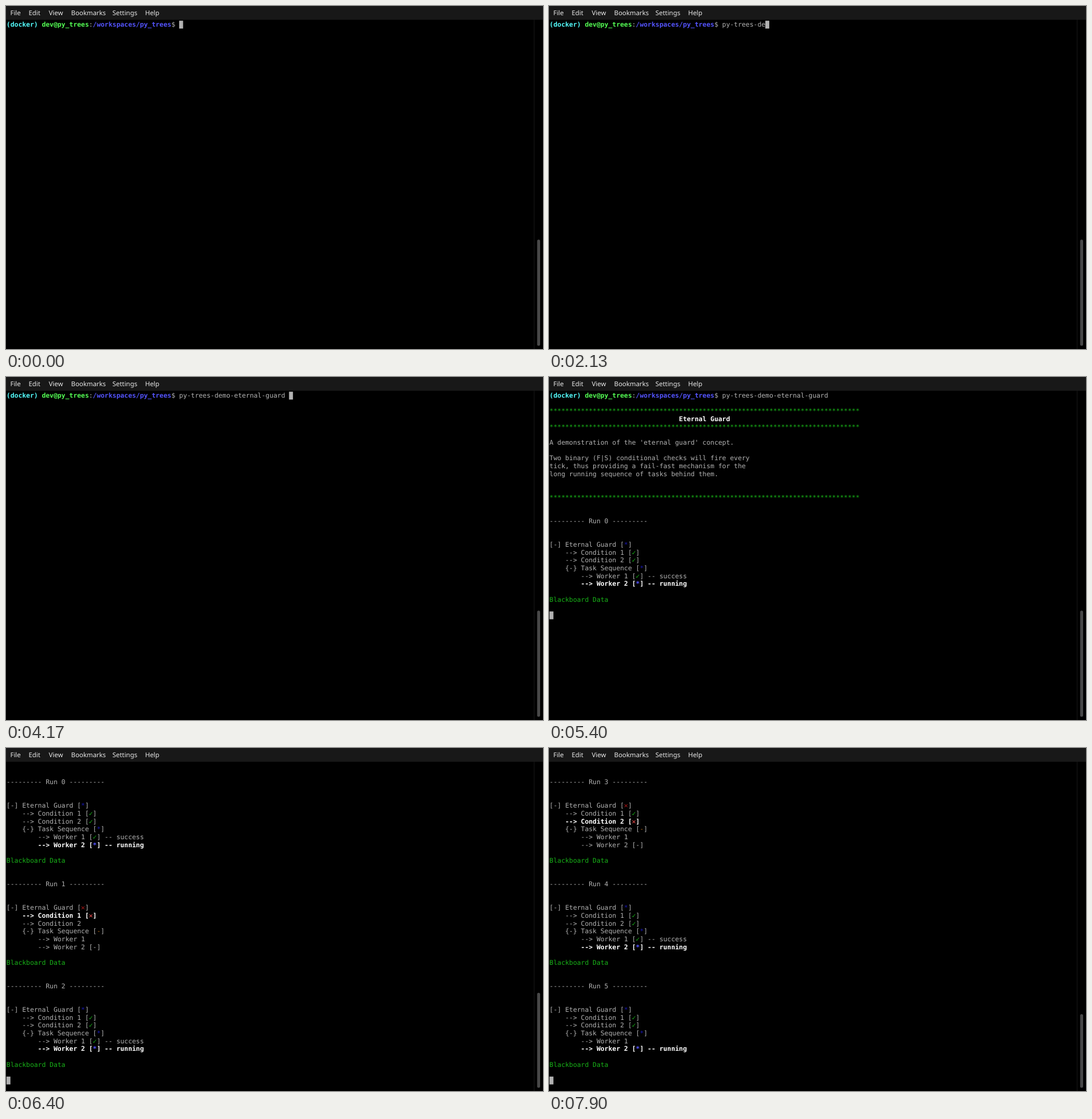
Recreate the animation shown at these times as an HTML page with a canvas. Size 936x598 px, loop 8000 ms.

```html
<!DOCTYPE html>
<html>
<head>
<meta charset="utf-8">
<style>
html, body { margin: 0; height: 100%; overflow: hidden; background: #000; }
canvas { display: block; }
</style>
</head>
<body>
<canvas width="936" height="598"></canvas>
<script>
const ctx = document.querySelector('canvas').getContext('2d');
const LOOP = 8000, SCALE = 0.855;
const CELL_W = 8, CELL_H = 16, LEFT = 1, TOP = 30, ROWS = 41;

// Lower case: normal weight, upper case: bold
const COLORS = {
  n: '#b2b2b2', g: '#18b218', b: '#1818b2', r: '#b21818', y: '#b26818',
  W: '#ffffff', G: '#54ff54', B: '#5454ff', R: '#ff5454', C: '#54ffff'
};
const MENU = { File: 8, Edit: 40, View: 75, Bookmarks: 114, Settings: 186, Help: 243 };

// "~x" inside a line switches to style x
const PROMPT = '~C(docker) ~Gdev@py_trees~n:~B/workspaces/py_trees~n$ ';
const PROMPT_COLS = 44;
const COMMAND = 'py-trees-demo-eternal-guard ';
const KEY_TIMES = [510, 610, 790, 880, 1080, 1160, 1300, 1480, 1780, 1980, 2130, 2190,
  2260, 2580, 2790, 2970, 3110];
const TYPO = 3260, ERASE = 3810, RETYPE = 3910, NEXT_KEY = 4010, COMPLETE = 4170;
const ENTER = 5200, FIRST_RUN = 5400, RUN_STEP = 500, RUN_ROWS = 13, FIRST_CURSOR = 28;

const STARS = '~g' + '*'.repeat(79);
const OK = '[~g✓~n]';
const INTRO = [
  '', STARS, ' '.repeat(33) + '~WEternal Guard', STARS, '',
  "A demonstration of the 'eternal guard' concept.", '',
  'Two binary (F|S) conditional checks will fire every',
  'tick, thus providing a fail-fast mechanism for the',
  'long running sequence of tasks behind them.', '', '', STARS, '', ''
];

function run(n, failedCondition, firstWorkerDone) {
  const mark = failedCondition ? '~r✕' : '~b*';
  const condition = i =>
    failedCondition === i ? `    ~W--> Condition ${i} [~R✕~W]`
    : `    --> Condition ${i}` + (failedCondition && i > failedCondition ? '' : ' ' + OK);
  return [
    `--------- Run ${n} ---------`, '', '',
    `[-] Eternal Guard [${mark}~n]`,
    condition(1),
    condition(2),
    `    {-} Task Sequence [${failedCondition ? '~y-' : mark}~n]`,
    '        --> Worker 1' + (firstWorkerDone ? ` ${OK} -- success` : ''),
    failedCondition ? '        --> Worker 2 [-]' : '        ~W--> Worker 2 [~B*~W] -- running',
    '', '~gBlackboard Data', '', ''
  ];
}

const OUTPUT = [
  ...INTRO,
  ...run(0, 0, true), ...run(1, 1, false), ...run(2, 0, true),
  ...run(3, 2, false), ...run(4, 0, true), ...run(5, 0, false)
];

function typed(t) {
  if (t >= COMPLETE) return COMMAND;
  if (t >= NEXT_KEY) return COMMAND.slice(0, 19);
  if (t >= RETYPE) return COMMAND.slice(0, 18);
  const text = COMMAND.slice(0, KEY_TIMES.filter(k => k <= t).length);
  return t >= TYPO && t < ERASE ? text + 'n' : text;
}

function drawLine(line, row) {
  let col = 0, style = 'n';
  line.split(/~(.)/).forEach((part, i) => {
    if (i % 2) { style = part; return; }
    ctx.fillStyle = COLORS[style];
    ctx.font = `${style < 'a' ? 'bold ' : ''}13.333px "DejaVu Sans Mono", monospace`;
    for (const ch of part) {
      if (ch !== ' ') ctx.fillText(ch, LEFT + col * CELL_W, TOP + row * CELL_H + 12);
      col++;
    }
  });
}

function drawWindow(scroll) {
  ctx.fillStyle = '#000';
  ctx.fillRect(0, 0, 936, 598);
  ctx.fillStyle = '#181818';
  ctx.fillRect(0, 0, 936, 24);
  ctx.fillRect(920, 24, 1, 574);

  const thumb = 22200 / (120 + scroll);
  ctx.fillStyle = '#484848';
  ctx.beginPath();
  ctx.roundRect(925.8, 592.3 - thumb, 5.2, thumb, 2.6);
  ctx.fill();

  ctx.fillStyle = '#e8e8e8';
  ctx.font = '11.4px "Noto Sans", sans-serif';
  for (const label in MENU) ctx.fillText(label, MENU[label] - 0.5, 16.2);
}

function draw(t) {
  const command = typed(t);
  let row = 0, col = PROMPT_COLS + command.length;
  if (t >= ENTER) { row = 1; col = 0; }
  if (t >= FIRST_RUN) row = FIRST_CURSOR + RUN_ROWS * Math.floor((t - FIRST_RUN) / RUN_STEP);
  const scroll = Math.max(0, row - ROWS + 1);

  ctx.textRendering = 'geometricPrecision';
  drawWindow(scroll);
  ctx.save();
  ctx.scale(SCALE, SCALE);
  [PROMPT + command, ...OUTPUT].slice(scroll, row + 1).forEach(drawLine);
  ctx.fillStyle = COLORS.n;
  ctx.fillRect(LEFT + col * CELL_W, TOP + (row - scroll) * CELL_H, CELL_W, CELL_H);
  ctx.restore();
}

const start = performance.now();
function tick() {
  draw((performance.now() - start) % LOOP);
  requestAnimationFrame(tick);
}
tick();
</script>
</body>
</html>
```
